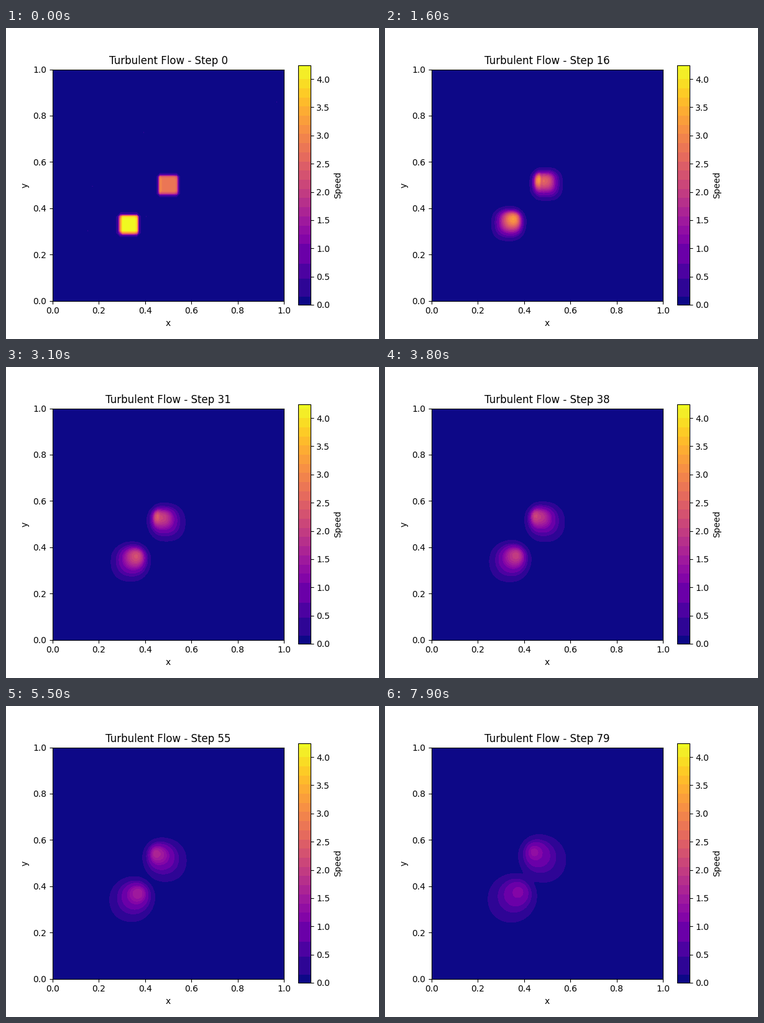
A matplotlib script that plays this animation: 600x500 px, repeating every 8 s.

```python
import numpy as np
import matplotlib.pyplot as plt
from matplotlib.animation import FuncAnimation

N = 100
STEPS = 80
ADV = 0.074    # dt / dx
DIFF = 0.1     # nu * dt / dx**2
TOP = 3 * np.sqrt(2)


def start():
    u, v = np.zeros((N, N)), np.zeros((N, N))
    # faint specks that fade at once
    for i, j in [(96, 85), (39, 72), (17, 49), (15, 30), (40, 36)]:
        u[j, i] = 0.26
    for c, su, sv in [(N // 2, -2, 2), (N // 3, 3, 3)]:
        box = slice(c - 4, c + 4)
        u[box, box], v[box, box] = su, sv
    return u, v


def advance(f, u, v):
    """One explicit Burgers step with backward differences."""
    mid = f[1:-1, 1:-1]
    left, right = f[1:-1, :-2], f[1:-1, 2:]
    down, up = f[:-2, 1:-1], f[2:, 1:-1]
    new = np.zeros_like(f)
    new[1:-1, 1:-1] = (mid
                       - ADV * u[1:-1, 1:-1] * (mid - left)
                       - ADV * v[1:-1, 1:-1] * (mid - down)
                       + DIFF * (left + right + down + up - 4 * mid))
    return new


def simulate():
    u, v = start()
    speeds = []
    for _ in range(STEPS):
        u, v = advance(u, u, v), advance(v, u, v)
        speeds.append(np.minimum(np.hypot(u, v), TOP - 1e-6))
    return speeds


speeds = simulate()
axis = np.linspace(0, 1, N)
levels = np.r_[0, 0.14, 0.46, 0.73, np.linspace(1.08, 4.16, 20), TOP]
mids = (levels[1:] + levels[:-1]) / 2
shade = (mids - mids[0]) / (mids[-1] - mids[0])
colors = plt.get_cmap("plasma")(shade)

fig, ax = plt.subplots(figsize=(6, 5), dpi=100)
ax.set_aspect("equal")
ax.set_xlabel("x")
ax.set_ylabel("y")


def fill(step):
    ax.set_title(f"Turbulent Flow - Step {step}")
    return ax.contourf(axis, axis, speeds[step], levels=levels, colors=colors)


field = fill(0)
bar = fig.colorbar(field, ax=ax, label="Speed", spacing="proportional",
                   ticks=np.arange(0, 4.1, 0.5), format="%.1f")
bar.minorticks_off()


def update(step):
    global field
    field.remove()
    field = fill(step)
    return [field]


anim = FuncAnimation(fig, update, frames=STEPS, init_func=lambda: [],
                     interval=100, repeat=True, repeat_delay=0)
plt.show()
```
